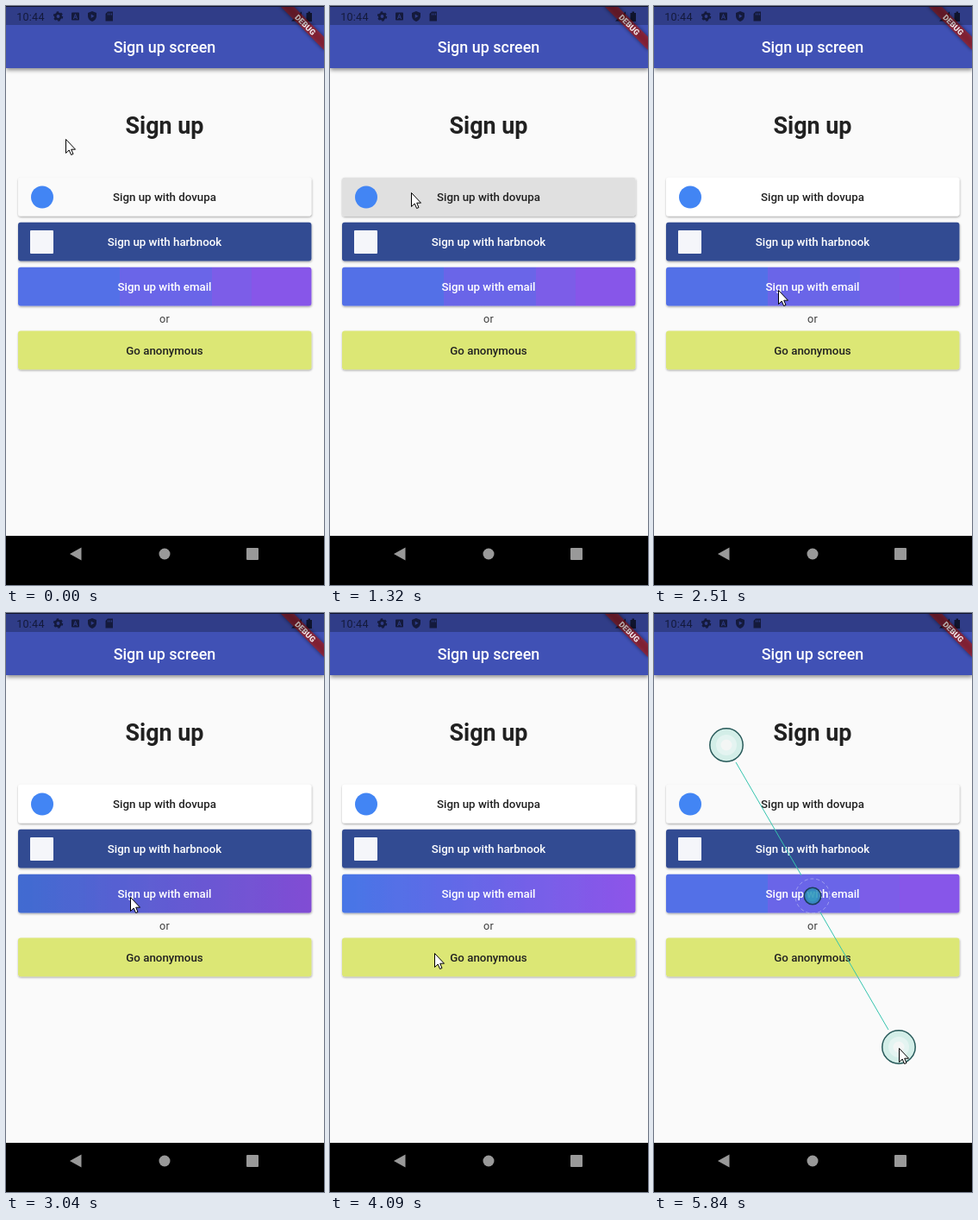
An HTML page that plays this animation: 369 by 671 pixels, repeating every 5.94 s.

```html
<!DOCTYPE html>
<html lang="en">
<head>
<meta charset="utf-8">
<title>Sign up screen</title>
<style>
  html, body { margin: 0; width: 100%; height: 100%; overflow: hidden; background: #fafafa; }
  svg { display: block; width: 100%; height: 100%; }
  text { font-family: Roboto, sans-serif; text-anchor: middle; }
  .label { font-size: 13.3px; font-weight: 500; }
</style>
</head>
<body>
<svg viewBox="0 0 369 671" xmlns="http://www.w3.org/2000/svg">
  <defs>
    <linearGradient id="smooth">
      <stop stop-color="#4776e6"/><stop offset="1" stop-color="#8e54e9"/>
    </linearGradient>
    <linearGradient id="banded"></linearGradient>
    <filter id="rest" x="-5%" y="-30%" width="110%" height="170%">
      <feDropShadow dx=".4" dy="1.2" stdDeviation=".9" flood-opacity=".36"/>
    </filter>
    <filter id="raised" x="-5%" y="-30%" width="110%" height="170%">
      <feDropShadow dx=".4" dy="2.5" stdDeviation="2.2" flood-opacity=".42"/>
    </filter>
    <filter id="blur" x="-20%" y="-100%" width="140%" height="300%">
      <feGaussianBlur stdDeviation="2"/>
    </filter>
  </defs>

  <rect width="369" height="671" fill="#fafafa"/>
  <rect width="369" height="72" fill="#3f51b5" filter="url(#raised)"/>
  <text x="184" y="54" font-size="17.96" font-weight="500" fill="#fff">Sign up screen</text>
  <text x="184" y="148" font-size="26.9" font-weight="700" fill="#212121">Sign up</text>
  <text x="184" y="367" font-size="12.6" letter-spacing=".2" fill="#3c3c3c">or</text>
  <g id="buttons"></g>

  <g fill="#141a3c">
    <path d="M331 17.500H343V6.500Z"/>
    <path d="M348.500 8H350.500V6.500H353V8H355V18H348.500Z"/>
  </g>
  <g transform="translate(369 0) rotate(45)">
    <rect x="-36" y="25.300" width="72" height="10.800" fill-opacity=".5" filter="url(#blur)"/>
    <rect x="-36" y="25.300" width="72" height="10.800" fill="#b71c1c" fill-opacity=".63"/>
    <text y="34" font-size="9.2" font-weight="900" fill="#fff" fill-opacity=".9">DEBUG</text>
  </g>
  <rect width="369" height="22" fill-opacity=".25"/>
  <rect width="369" height="1" fill="#10142c"/>
  <g fill="#141a3c">
    <text x="28.5" y="16.500" font-size="12.6" letter-spacing=".2">10:44</text>
    <circle cx="60.500" cy="12" r="3.200" fill="none" stroke="#141a3c" stroke-width="2.600"/>
    <circle cx="60.500" cy="12" r="4.900" fill="none" stroke="#141a3c" stroke-width="1.600" stroke-dasharray="2.6 2.53"/>
    <rect x="76" y="7.500" width="9" height="9" rx="1"/>
    <path d="M100 6L105 8V12Q104.500 16.500 100 18Q95.500 16.500 95 12V8Z"/>
    <path d="M118 6.500H124V17.500H115.500V9Z"/>
    <g fill="none" stroke="#2f3d88">
      <path d="M78.500 15L80.500 9.500L82.500 15M79.300 13.200H81.700"/>
      <path d="M98.700 9.500L102.500 11.800L98.700 14Z" fill="#2f3d88" stroke="none"/>
      <path d="M118.500 8.500V10.500M120.500 8.500V10.500M122.500 8.500V10.500"/>
    </g>
  </g>

  <rect y="614" width="369" height="57"/>
  <g fill="#999">
    <path d="M74 635L87.500 627.500V642.500Z"/>
    <circle cx="184" cy="635" r="6.500"/>
    <rect x="279" y="628" width="14" height="14" rx="1"/>
  </g>

  <g id="swipe">
    <path d="M95 173L171 304M193 347L272 483" stroke="#35c4ae" fill="none"/>
    <circle cx="184" cy="328" r="20" fill="none" stroke="#c9cdf0" stroke-opacity=".55" stroke-dasharray="4 3"/>
    <circle cx="184" cy="328" r="9.700" fill="#2a8fb5" fill-opacity=".8" stroke="#1c3f5c" stroke-width="1.600"/>
    <circle cx="184" cy="328" r="6.500" fill="#38a5bf" fill-opacity=".5"/>
  </g>
  <path id="cursor" d="M.5 .5V16.500L4.200 13L6.600 18.500L9 17.500L6.700 12.200H11.500Z" fill="#fff" stroke="#000"/>
</svg>
<script>
const LOOP = 5940, SWIPE_AT = 5840;
const START = 498, STEP = 133;
const CENTER = 184;
const $ = id => document.getElementById(id);
const mix = (a, b, k) => a + (b - a) * k;
const clamp = k => Math.min(1, Math.max(0, k));
const easeOut = k => 1 - (1 - k) ** 2;

function set(el, attrs) {
  for (const k in attrs) el.setAttribute(k, attrs[k]);
}
function add(parent, tag, attrs, text = '') {
  const el = document.createElementNS('http://www.w3.org/2000/svg', tag);
  set(el, attrs);
  el.textContent = text;
  return parent.appendChild(el);
}

// The same gradient in flat bands, each with the colour of its middle
[0, .347, .66, .797, 1].forEach((to, i, edges) => {
  if (!i) return;
  const from = edges[i - 1], k = (from + to) / 2;
  const color = `rgb(${mix(71, 142, k)} ${mix(118, 84, k)} ${mix(230, 233, k)})`;
  for (const offset of [from, to]) add($('banded'), 'stop', { offset, 'stop-color': color });
});

const buttons = [
  { y: 198.7, fill: '#fff', idle: '#fafafa', label: 'Sign up with dovupa', press: 3.7 },
  { y: 250.7, fill: '#324b92', light: true, label: 'Sign up with harbnook', press: 10.95 },
  { y: 302.7, fill: 'url(#smooth)', idle: 'url(#banded)', light: true, label: 'Sign up with email', press: 16.7 },
  { y: 376.5, fill: '#dce775', label: 'Go anonymous', press: 23.7 }
];
buttons.forEach((b, i) => {
  const g = $('buttons'), box = { x: 14, y: b.y, width: 340.4, height: 44.8, rx: 3 };
  add(add(document.querySelector('defs'), 'clipPath', { id: 'clip' + i }), 'rect', box);
  b.base = add(g, 'rect', box);
  b.ripple = add(g, 'circle', { 'clip-path': `url(#clip${i})`, opacity: b.light ? .09 : .12 });
  add(g, 'text', { class: 'label', x: CENTER, y: Math.round(b.y + 27), fill: b.light ? '#fff' : '#212121' }, b.label);
});
add($('buttons'), 'circle', { cx: 42, cy: 221.5, r: 13, fill: '#4285f4' });
add($('buttons'), 'rect', { x: 28, y: 260, width: 27, height: 27, rx: 1, fill: '#f5f6fa' });

for (const [cx, cy] of [[84, 153], [284, 503]]) {
  const ring = (r, fill, stroke = 'none') =>
    add($('swipe'), 'circle', { cx, cy, r, fill, stroke, 'stroke-width': 1.5 });
  ring(19.2, '#d3eee8', '#285a5a');
  ring(12, '#e4f4f1');
  ring(6.5, '#f3f6f5');
}

// Pointer legs: first tick, last tick, end point
const legs = [
  [.5, 2, 94, 216],
  [7, 9, 89, 262],
  [12, 15, 144, 329],
  [19, 22, 121, 394],
  [27.75, 29.6, 284, 504]
];
function pointer(n) {
  return legs.reduce(([x, y], [from, to, endX, endY]) => {
    const k = easeOut(clamp((n - from) / (to - from)));
    return [mix(x, endX, k), mix(y, endY, k)];
  }, [69, 154]);
}

// A press raises the button while its ripple grows and drifts to the middle
function drawButton(b, n) {
  const age = n - b.press;
  const active = age >= 0 && age < 3;
  const [x, y] = pointer(b.press);
  const drift = clamp(age * .55);
  set(b.ripple, {
    cx: mix(x, CENTER, drift),
    cy: mix(y, b.y + 22.4, drift),
    r: active ? 55 * 2.8 ** age : 0
  });
  set(b.base, {
    fill: age < 0 && b.idle || b.fill,
    filter: `url(#${active && age < 2 ? 'raised' : 'rest'})`
  });
}

function draw(t) {
  const n = Math.floor((t - START) / STEP);
  const swipe = t >= SWIPE_AT;
  const [x, y] = pointer(n).map(Math.round);
  set($('cursor'), { transform: `translate(${x} ${y})` });
  buttons.forEach(b => drawButton(b, swipe ? -1 : n));
  set($('swipe'), { visibility: swipe ? 'visible' : 'hidden' });
}

const start = performance.now();
function tick() {
  draw((performance.now() - start) % LOOP);
  requestAnimationFrame(tick);
}
tick();
</script>
</body>
</html>
```
